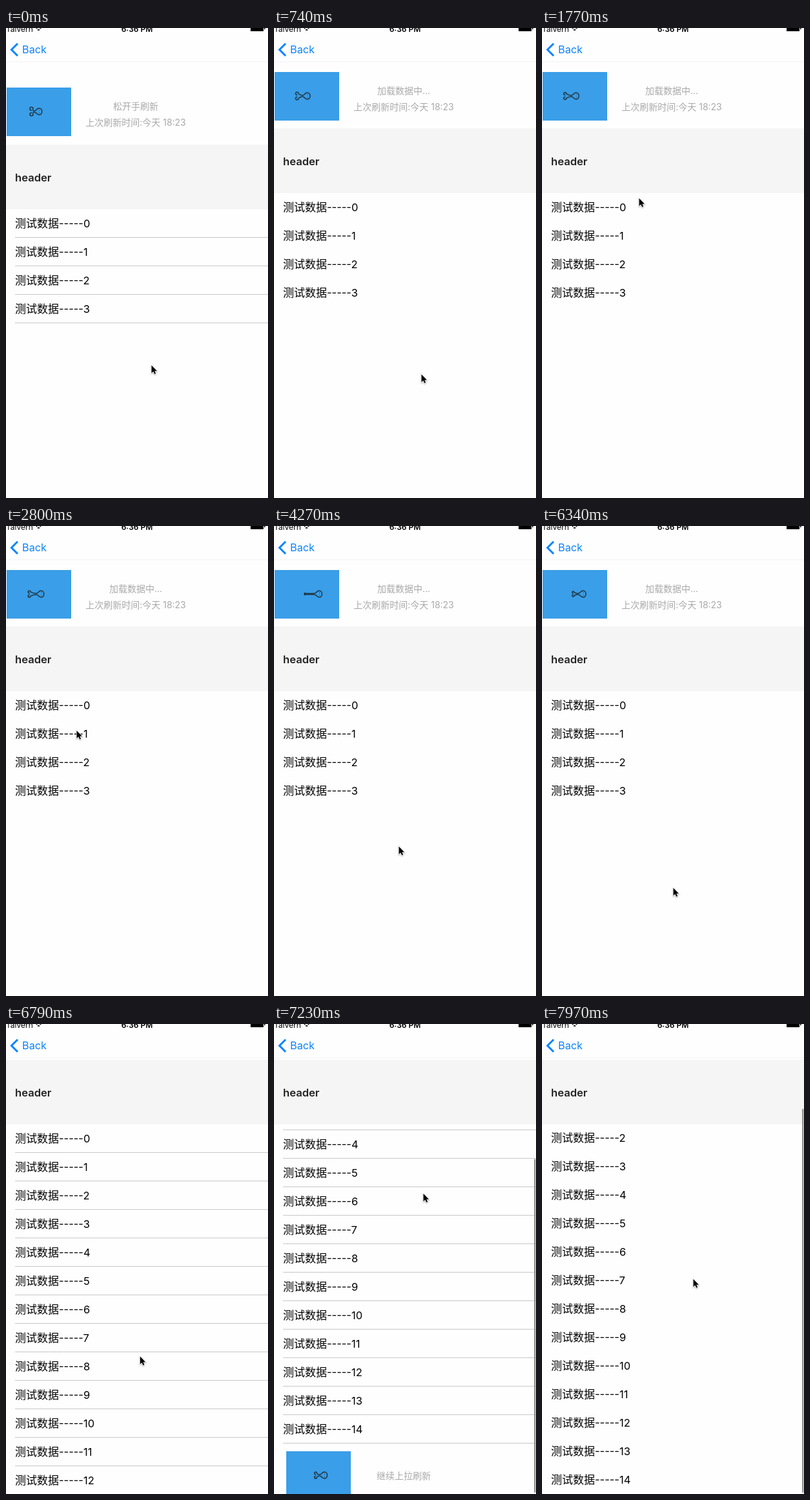
Recreate the animation shown at these times as an HTML page with a canvas. Size 406 by 726 pixels, loop 8 s.

```html
<!DOCTYPE html>
<html lang="zh">
<head>
<meta charset="utf-8">
<title>Pull to refresh</title>
<style>
  html, body { margin: 0; width: 100%; height: 100%; overflow: hidden; background: #fefefe; }
  canvas { display: block; }
</style>
</head>
<body>
<canvas id="stage" width="406" height="726"></canvas>
<script>
const W = 406, H = 726, LOOP = 8000, STEP = 147.5;
const NAV = 55, ROW = 44, HEADER = 100, PULL = 100, SCROLL_END = 189.5;
const BLUE = '#3a9ee8', INK = '#20343f', TINT = '#0a84ff', GREY = '#a9a9a9';
const ctx = document.getElementById('stage').getContext('2d');

// Eased progress from 0 to 1 between two times
function ramp(t, from, to) {
  const k = Math.min(Math.max((t - from) / (to - from), 0), 1);
  return k * k * (3 - 2 * k);
}

// Spring back, end of refresh, drag past the end, bounce
function scrollAt(t) {
  return -24.5 * (1 - ramp(t, 0, 442))
    + PULL * ramp(t, 6490, 6785)
    + 167 * ramp(t, 6785, 7227)
    - 77.5 * ramp(t, 7375, 7900);
}

const MOVES = [
  { from: 150, to: 740, x: 228, y: 534 },
  { from: 740, to: 1180, x: 150, y: 262 },
  { from: 2360, to: 2800, x: 109, y: 315 },
  { from: 2800, to: 3540, x: 193, y: 494 },
  { from: 4270, to: 4720, x: 203, y: 558 },
  { from: 6640, to: 7227, x: 231, y: 261 },
  { from: 7375, to: 7965, x: 234, y: 393 },
];
function pointerAt(t) {
  let x = 225, y = 520;
  for (const move of MOVES) {
    const k = ramp(t, move.from, move.to);
    x += (move.x - x) * k;
    y += (move.y - y) * k;
  }
  return { x, y };
}

// One swimming stroke per unit of phase
function swim(phase) {
  const wave = shift => Math.cos(2 * Math.PI * (phase - shift));
  const head = 64 + 10 * wave(0.15);
  return { head, tail: head - 24 - 5 * wave(0.02), spread: 2.6 - 1.8 * wave(0.1) };
}

function rect(x, y, w, h, color) {
  ctx.fillStyle = color;
  ctx.fillRect(x, y, w, h);
}

function text(value, x, y, size, color, align = 'left', weight = 400) {
  ctx.font = `${weight} ${size}px Inter, "Noto Sans CJK SC", "Noto Sans CJK", sans-serif`;
  ctx.fillStyle = color;
  ctx.textAlign = align;
  ctx.fillText(value, x, y);
}

function swimmer({ head, tail, spread }) {
  const neck = head - 12, r = 0.3 + spread * 0.5;
  ctx.strokeStyle = ctx.fillStyle = INK;
  ctx.lineWidth = 1.5;
  ctx.beginPath();
  ctx.moveTo(neck, -1);
  ctx.bezierCurveTo(neck + 3, -1, head - 9, -5, head - 5, -5);
  ctx.bezierCurveTo(head + 1, -5, head + 1, 5, head - 5, 5);
  ctx.bezierCurveTo(head - 9, 5, neck + 3, 1, neck, 1);
  for (const side of [-1, 1]) {
    ctx.moveTo(neck, side);
    ctx.quadraticCurveTo(neck - 3, side * 0.4, tail + 2 * r, side * spread);
    ctx.arc(tail + r, side * spread, r, 0, side * 5, side < 0);
  }
  ctx.stroke();
  for (const y of [-2, 2]) ctx.fillRect(head - 5, y - 0.5, 1, 1);
}

function refreshBox(x, y, phase) {
  ctx.save();
  ctx.translate(x, Math.round(y));
  rect(0, 0, 100, 75, BLUE);
  ctx.translate(0, 37);
  swimmer(swim(phase));
  ctx.restore();
}

function refreshHeader(y, t) {
  const held = t === 0;
  refreshBox(1, y + 12.5, held ? 0.57 : t / 1000);
  text(held ? '松开手刷新' : '加载数据中...', 201, y + 46.5, 14, GREY, 'center');
  text('上次刷新时间:今天 18:23', 201, y + 71.5, 14, GREY, 'center');
}

function refreshFooter(y) {
  refreshBox(19, y + 12, 0.4);
  text('继续上拉刷新', 201, y + 55, 14, GREY, 'center');
}

function rows(top, count, lines) {
  for (let i = 0; i < count; i++) {
    const y = top + i * ROW;
    text('测试数据', 14, y + 28, 17, '#000');
    text('-----' + i, 82, y + 28, 16.5, '#000');
    if (lines) rect(14, Math.round(y) + ROW - 1, W - 14, 1, '#c8c8cb');
  }
}

function navigation() {
  rect(0, 0, W, NAV, '#fefefe');
  rect(0, 51, W, 2, '#f8f8f8');
  text('Talvern', 0, 6, 12, '#000');
  text('6:36 PM', 203, 6, 12, '#000', 'center', 600);
  rect(379, 0, 20, 5, '#000');
  rect(400, 0, 1.5, 2, '#000');
  ctx.strokeStyle = '#000';
  ctx.lineWidth = 1.6;
  for (const r of [2.2, 5.5]) {
    ctx.beginPath();
    ctx.arc(50.5, 5, r, -2.3, -0.84);
    ctx.stroke();
  }
  ctx.strokeStyle = TINT;
  ctx.lineWidth = 3;
  ctx.beginPath();
  ctx.moveTo(18, 24);
  ctx.lineTo(8.5, 33.5);
  ctx.lineTo(18, 43);
  ctx.stroke();
  text('Back', 25, 39, 16.3, TINT);
}

function scrollbar(scroll) {
  const over = Math.max(scroll - SCROLL_END, 0);
  const travel = (Math.min(scroll, SCROLL_END) - PULL) / (SCROLL_END - PULL);
  ctx.fillStyle = '#929292';
  ctx.beginPath();
  ctx.roundRect(403, 58 + 73 * travel + over, 2.4, 593 - over, 1.2);
  ctx.fill();
}

const arrow = new Path2D('M0 0V15.5L3.6 12.2L6 17.6L8.6 16.5L6.3 11.3H11Z');
function pointer({ x, y }) {
  ctx.save();
  ctx.translate(x + 0.5, y + 1);
  ctx.scale(0.77, 0.77);
  ctx.shadowColor = 'rgba(0,0,0,.35)';
  ctx.shadowBlur = 2;
  ctx.shadowOffsetY = 1;
  ctx.strokeStyle = '#fff';
  ctx.lineWidth = 2;
  ctx.stroke(arrow);
  ctx.shadowColor = 'transparent';
  ctx.fillStyle = '#000';
  ctx.fill(arrow);
  ctx.restore();
}

function draw(now) {
  const t = Math.floor((now % LOOP + 5) / STEP) * STEP;
  const scroll = scrollAt(t);
  const loaded = t > 6600;
  const moving = t < 400 || (loaded && t < 7800);
  const count = loaded ? 15 : 4;
  const listTop = NAV + PULL + HEADER - scroll;

  rect(0, 0, W, H, '#fefefe');
  refreshHeader(NAV - scroll, t);
  rows(listTop, count, moving);
  if (loaded) refreshFooter(listTop + count * ROW);
  const headerTop = Math.round(Math.max(NAV, NAV + PULL - scroll));
  rect(0, headerTop, W, HEADER, '#f5f5f5');
  text('header', 14, headerTop + 56.5, 16.6, '#222', 'left', 600);
  navigation();
  if (t > 6800) scrollbar(scroll);
  pointer(pointerAt(t));
}

function tick() {
  draw(performance.now());
  requestAnimationFrame(tick);
}
tick();
</script>
</body>
</html>
```
